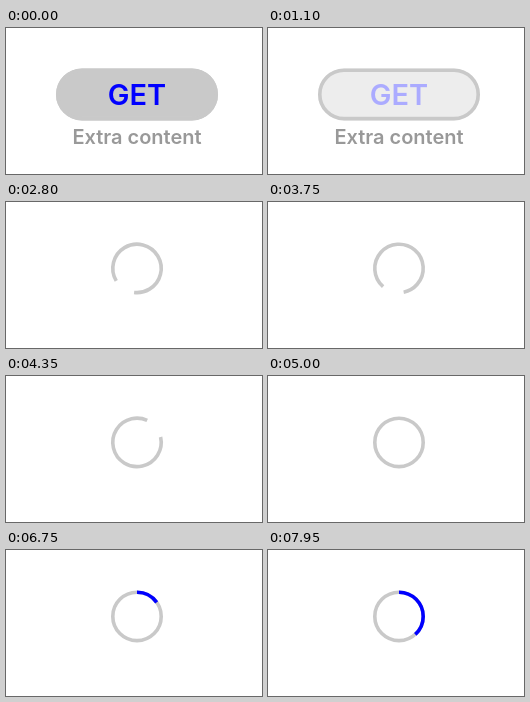
An HTML page for the animation above (8 s loop, 256 by 146 pixels).

```html
<!DOCTYPE html>
<html lang="en">
<head>
<meta charset="utf-8">
<title>Download button</title>
<style>
  html, body { margin: 0; width: 100%; height: 100%; overflow: hidden; background: #fff; }
  svg { display: block; width: 100%; height: 100%; }
  text { font-family: Inter, sans-serif; font-weight: 600; text-anchor: middle; }
  .line { fill: none; stroke: #c9c9c9; stroke-width: 3.6; }
  .blue { stroke: #00f; }
</style>
</head>
<body>
<svg viewBox="0 0 256 146">
  <g id="face">
    <rect x="50" y="40.4" width="162" height="52" rx="26" fill="#c9c9c9"/>
    <text x="131" y="77.4" font-size="29" fill="#00f">GET</text>
  </g>
  <text id="caption" x="131" y="116" font-size="20" fill="#999">Extra content</text>
  <path id="outline" class="line"/>
  <path id="ring" class="line"/>
  <path id="progress" class="line blue"/>
</svg>
<script>
const LOOP = 8000;
const FADE = 1000, FADE_TIME = 150;
const UNWIND = 1855, UNWIND_TIME = 300;
const SPIN_ORIGIN = 2137, SPIN_END = 5000, SPIN_ARC = 0.85;
const CX = 131, CY = 66.4, R = 24.2, HALF = 55;

const TURN = 2 * Math.PI * R;
const PILL = 4 * HALF + TURN;
const [face, caption, outline, ring, progress] =
  ['face', 'caption', 'outline', 'ring', 'progress'].map(id => document.getElementById(id));

const clamp = x => Math.min(1, Math.max(0, x));
const arcTo = (x, y) => `A${R} ${R} 0 0 1 ${x} ${y}`;
const top_ = CY - R, bottom = CY + R;
const circle = arcTo(CX, bottom) + arcTo(CX, top_);

// The outline runs once round the pill, then on into the ring.
outline.setAttribute('d', `M${CX} ${top_}H${CX + HALF}${arcTo(CX + HALF, bottom)}` +
  `H${CX - HALF}${arcTo(CX - HALF, top_)}H${CX}${circle}`);
for (const el of [ring, progress]) el.setAttribute('d', `M${CX} ${top_}${circle}`);

// cubic-bezier(.42, 0, 1, 1)
function easeIn(x) {
  let lo = 0, hi = 1;
  for (let i = 0; i < 24; i++) {
    const s = (lo + hi) / 2, u = 1 - s;
    if (1.26 * u * u * s + 3 * u * s * s + s ** 3 < x) lo = s; else hi = s;
  }
  return lo * lo * (3 - 2 * lo);
}
const easeOut = x => 1 - easeIn(1 - x);

function show(el, visible) {
  el.style.display = visible ? '' : 'none';
}

function trim(el, from, to) {
  el.style.strokeDasharray = `${to - from} 2000`;
  el.style.strokeDashoffset = -from;
}

function draw(t) {
  face.style.opacity = 1 - clamp((t - FADE) / FADE_TIME);
  show(caption, t < 1850);

  const unwind = clamp((t - UNWIND) / UNWIND_TIME);
  show(outline, unwind < 1);
  trim(outline, PILL * easeOut(unwind), PILL + TURN * SPIN_ARC * easeIn(unwind));

  const spinning = t < SPIN_END;
  show(ring, unwind === 1);
  trim(ring, 0, spinning ? TURN * SPIN_ARC : TURN + 1);
  const angle = spinning ? (t - SPIN_ORIGIN) * 0.36 : 0;
  ring.setAttribute('transform', `rotate(${angle} ${CX} ${CY})`);

  // Two linear steps of a fifth each, with a short pause between them.
  const done = 0.2 * (clamp((t - 6000) / 1000) + clamp((t - 7050) / 1000));
  show(progress, done > 0);
  trim(progress, 0, TURN * done);
}

function tick() {
  draw(performance.now() % LOOP);
  requestAnimationFrame(tick);
}
tick();
</script>
</body>
</html>
```
